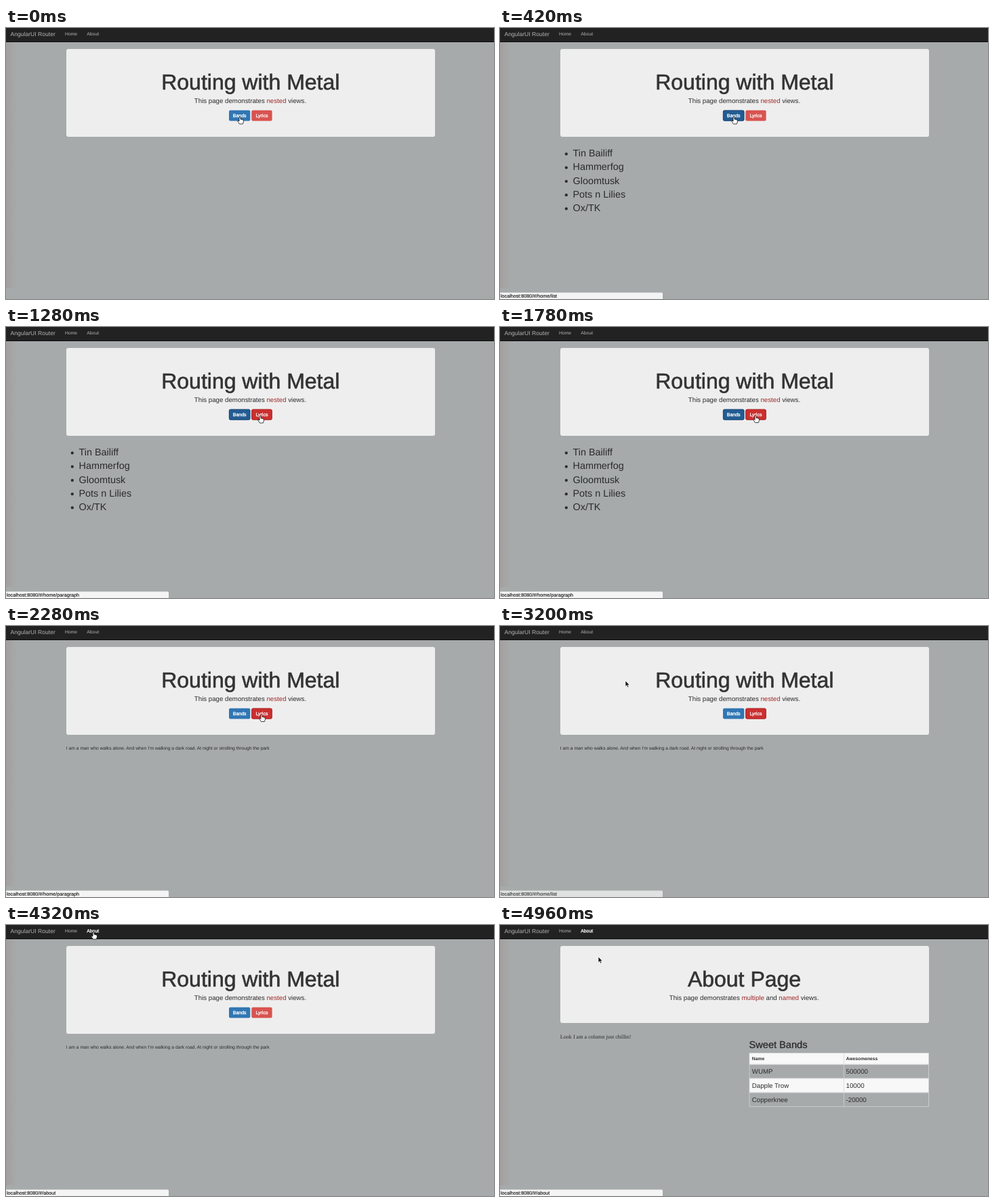
An HTML page for the animation above (4980 ms loop, 720 by 401 pixels).

```html
<!DOCTYPE html>
<html lang="en">
<head>
<meta charset="utf-8">
<title>Nested views</title>
<style>
html, body { margin: 0; width: 100%; height: 100%; overflow: hidden; background: #a6aaaa; }
svg { display: block; font-family: "Liberation Sans", Arial, sans-serif; text-rendering: geometricPrecision; }
text { fill: #2b2b2b; white-space: pre; }
.mid { text-anchor: middle; }
.h1 { font-size: 32px; fill: #333; stroke: #333; stroke-width: .6; }
.lead { font-size: 9.7px; }
.lead tspan { fill: #a02a2a; }
.btn { font-size: 7px; fill: #fff; stroke: #fff; stroke-width: .3; }
.nav { font-size: 6.8px; fill: #b4b4b4; }
.nav.on { fill: #fff; stroke: #fff; stroke-width: .3; }
.list { font-size: 14.4px; }
.th { font-size: 6.75px; font-weight: bold; }
.td { font-size: 9.7px; }
</style>
</head>
<body>
<svg width="720" height="401" viewBox="0 0 720 401">
  <defs>
    <linearGradient id="edge">
      <stop offset="0" stop-color="#a39f9e"/>
      <stop offset="1" stop-color="#a6aaaa"/>
    </linearGradient>
  </defs>
  <rect width="720" height="401" fill="#a6aaaa"/>
  <rect y="21" width="16" height="364" fill="url(#edge)"/>
  <rect width="720" height="21" fill="#222"/>
  <rect y="20" width="720" height="1" fill="#0c0c0c"/>
  <text x="6.5" y="11.5" font-size="8.6" style="fill:#b4b4b4">AngularUI Router</text>
  <text class="nav" x="87" y="11">Home</text>
  <text class="nav" id="aboutLink" x="119.3" y="11">About</text>

  <g id="home">
    <rect x="89" y="31" width="544" height="130" rx="3" fill="#eee"/>
    <text class="h1 mid" x="360.8" y="91">Routing with Metal</text>
    <text class="lead mid" x="360.5" y="110.5">This page demonstrates <tspan>nested</tspan> views.</text>
    <rect x="329" y="121.7" width="31.3" height="15.8" rx="2" fill="#3176b3"/>
    <rect id="bandsDark" x="329.3" y="122" width="30.7" height="15.2" rx="2" fill="#235c92" stroke="#173f66" stroke-width=".8"/>
    <text class="btn mid" x="344.7" y="132.2">Bands</text>
    <rect x="362.3" y="121.7" width="30.3" height="15.8" rx="2" fill="#d9534f"/>
    <rect id="lyricsDark" x="362.6" y="122" width="29.7" height="15.2" rx="2" fill="#cc2f2f" stroke="#a02323" stroke-width=".8"/>
    <text class="btn mid" x="377.4" y="132.2">Lyrics</text>
    <g id="bands"></g>
    <text id="lyrics" x="88.8" y="182.6" font-size="6.76">I am a man who walks alone. And when I'm walking a dark road. At night or strolling through the park</text>
  </g>

  <g id="about">
    <rect x="89" y="31" width="544" height="114" rx="3" fill="#eee"/>
    <text class="h1 mid" x="360.5" y="91">About Page</text>
    <text class="lead mid" x="360.2" y="110.5">This page demonstrates <tspan>multiple</tspan> and <tspan>named</tspan> views.</text>
    <text x="88.8" y="167.6" font-size="8.1" font-family="'Liberation Serif', Times, serif">Look I am a column just chillin!</text>
    <text x="367.5" y="182" font-size="14.6" stroke="#2b2b2b" stroke-width=".3">Sweet Bands</text>
    <g id="table"></g>
  </g>

  <g id="status">
    <path d="M0 391.5H238.5Q240 391.5 240 393V401H0Z" fill="#f4f4f4"/>
    <text id="url" x="1" y="399" font-size="7.2" style="fill:#111;stroke:#111;stroke-width:.12"></text>
  </g>

  <g id="cursor">
    <path id="arrow" d="M0 0V8.6L2 6.8 3.4 10 5 9.3 3.6 6.2H6.2Z" fill="#111" stroke="#fff" stroke-width=".7"/>
    <path id="hand" d="M-1 1Q0-.6 1 1V4.2Q2 3.4 2.7 4.5 3.7 3.9 4.2 5 5.4 4.7 5.4 6.2V8L4.3 11H-.6L-3 7.2Q-3.4 5.6-2 6L-1 7Z" fill="#fff" stroke="#111" stroke-width=".8"/>
  </g>
</svg>
<script>
const $ = id => document.getElementById(id);
const LOOP = 4980;

$('bands').innerHTML = ['Tin Bailiff', 'Hammerfog', 'Gloomtusk', 'Pots n Lilies', 'Ox/TK'].map((name, i) => {
  const y = 190 + i * 20.25;
  return `<circle cx="97.8" cy="${y - 3.6}" r="2.1" fill="#2b2b2b"/><text class="list" x="107.5" y="${y}">${name}</text>`;
}).join('');

const rows = [['Name', 'Awesomeness'], ['WUMP', '500000'], ['Dapple Trow', '10000'], ['Copperknee', '-20000']];
$('table').innerHTML = rows.map(([name, score], i) => {
  const y = i ? 185.5 + i * 20.8 : 189.5, h = i ? 20.8 : 16.8;
  const cls = i ? 'td' : 'th', base = y + (i ? 13.8 : 10.8);
  return `<path d="M368 ${y}H632.5V${y + h}H368ZM507.3 ${y}V${y + h}" fill="${i % 2 ? 'none' : '#f8f8f8'}" stroke="#d6d6d6" stroke-width=".8"/>
    <text class="${cls}" x="371.8" y="${base}">${name}</text><text class="${cls}" x="510.6" y="${base}">${score}</text>`;
}).join('');

// pointer tip: time, x, y
const path = [
  [0, 345, 131], [660, 345, 131], [1180, 375, 131], [1300, 375, 131], [1700, 377, 130.5],
  [2680, 377, 130.5], [2840, 345, 127], [3200, 185, 81], [3240, 184, 80], [3740, 128, 11],
  [3940, 129, 10], [4840, 129, 10], [4960, 145, 47], [LOOP, 145, 47]
];
const urls = [[0, 'home/list'], [920, 'home/paragraph'], [2760, 'home/list'], [3600, 'about']];

const ramp = (t, a, b) => Math.min(1, Math.max(0, (t - a) / (b - a)));
const pulse = (t, a, b, c, d) => ramp(t, a, b) - ramp(t, c, d);
const show = (id, on) => $(id).style.display = on ? '' : 'none';
const fade = (id, v) => $(id).style.opacity = v;

function pointer(t) {
  const i = path.findIndex(p => p[0] > t);
  const [t0, x0, y0] = path[i - 1], [t1, x1, y1] = path[i];
  const k = ramp(t, t0, t1);
  return [x0 + (x1 - x0) * k, y0 + (y1 - y0) * k];
}

function draw(t) {
  const onAbout = t >= 4360;
  show('home', !onAbout);
  show('about', onAbout);
  show('bands', t >= 200 && t < 1940);
  show('lyrics', t >= 1940);

  fade('bandsDark', pulse(t, 20, 160, 1820, 1940) + pulse(t, 2740, 2800, 2880, 2940));
  fade('lyricsDark', t < 4080 ? ramp(t, 900, 1000) : 0);
  fade('status', pulse(t, 60, 200, 3160, 3320) + ramp(t, 3740, 3900));
  $('url').textContent = 'localhost:8080/#/' + urls.filter(u => u[0] <= t).pop()[1];

  const [x, y] = pointer(t);
  const overLink = y < 21 && x > 117 && x < 140;
  const overButton = !onAbout && y > 121 && y < 138 && x > 329 && x < 393;
  show('hand', overLink || overButton);
  show('arrow', !overLink && !overButton);
  $('aboutLink').classList.toggle('on', overLink || onAbout);
  $('cursor').setAttribute('transform', `translate(${x} ${y})`);
}

const start = performance.now();
function tick() {
  draw((performance.now() - start) % LOOP);
  requestAnimationFrame(tick);
}
tick();
</script>
</body>
</html>
```
